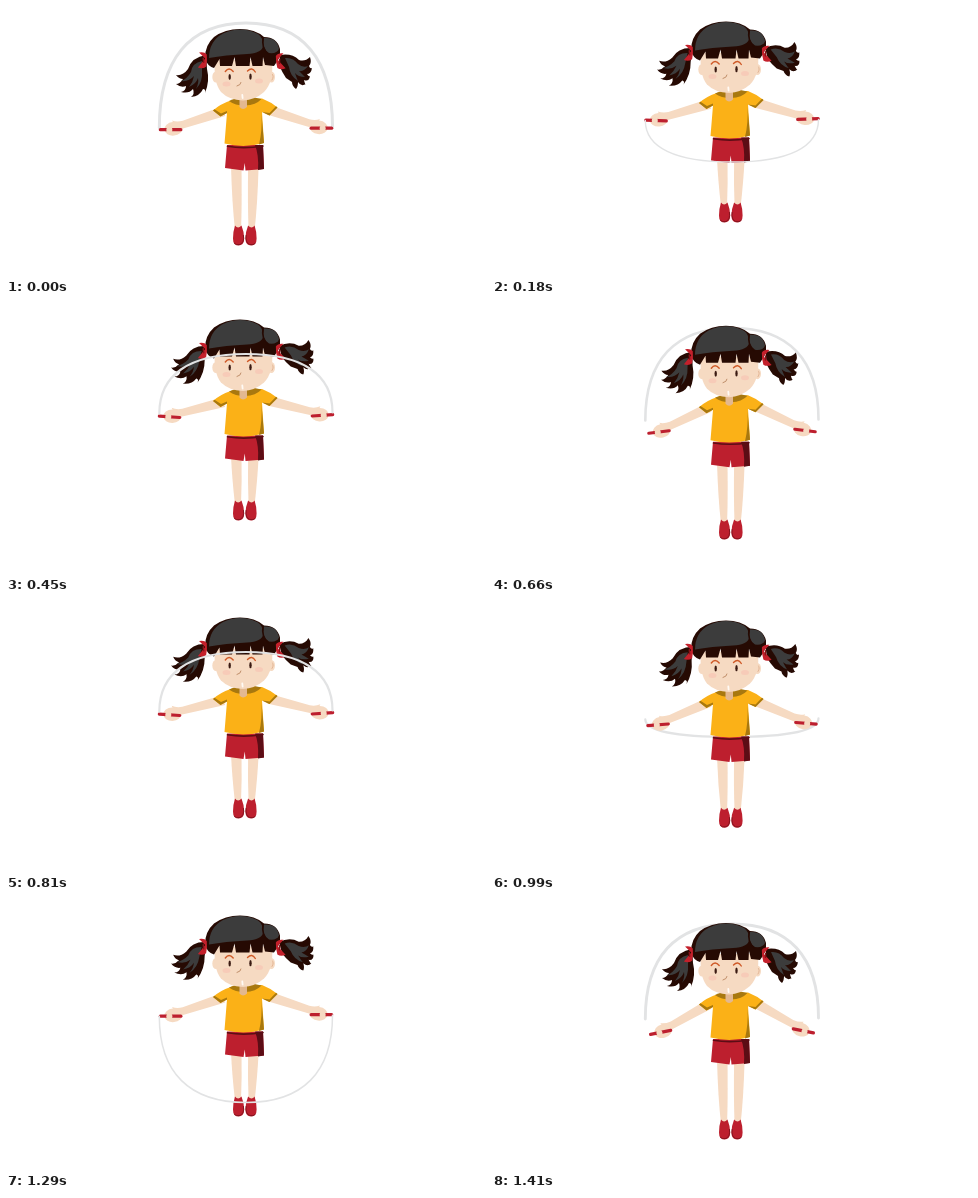
An HTML page with a canvas that plays this animation: 480 by 270 pixels, repeating every 1440 ms.

```html
<!DOCTYPE html>
<html lang="en">
<head>
<meta charset="utf-8">
<title>Skipping rope</title>
<style>
  html, body { margin: 0; width: 100%; height: 100%; overflow: hidden; background: #fff; }
  canvas { display: block; }
</style>
</head>
<body>
<canvas id="stage" width="480" height="270"></canvas>
<script>
const ctx = document.getElementById('stage').getContext('2d');
const STEP = 30;
const STEPS_PER_JUMP = 12;
const GRIP_TILT = 18;

const color = {
  hair: '#260a03', shine: '#3c3c3c', skin: '#f6dac2', neck: '#e3b890',
  shirt: '#fbb117', shirtShade: '#a8780f', red: '#bd1f2e', darkRed: '#5c0d15',
  bow: '#c4202b', brow: '#cf5a28', cheek: '#f7cbb8', rope: '#e2e3e4'
};

// Keys are [step, value] pairs over one jump
const motion = {
  jump:  [[0, 0], [1, .35], [2, .75], [3, 1], [8, 1], [9, .6], [10, .17], [11, 0], [12, 0]],
  arm:   [[0, 18], [1, 16], [3, 14], [6, 16], [8, 20], [10, 25], [11, 29], [12, 18]],
  apex:  [[0, 17], [1, 14], [2, 29], [3, 50], [6, 156], [8, 249], [9, 135], [10, 24], [11, 24], [12, 17]],
  grip:  [[0, 122], [3, 109.5], [6, 114.5], [8, 118], [10, 116.5], [11, 119], [12, 122]]
};

function valueAt(keys, step) {
  const i = keys.findIndex(key => key[0] > step);
  const [s0, v0] = keys[i - 1], [s1, v1] = keys[i];
  return v0 + (v1 - v0) * (step - s0) / (s1 - s0);
}

const rad = degrees => degrees * Math.PI / 180;

function fill(path, style) {
  ctx.fillStyle = style;
  ctx.fill(new Path2D(path));
}

function line(path, style, width) {
  ctx.strokeStyle = style;
  ctx.lineWidth = width;
  ctx.lineCap = 'round';
  ctx.stroke(new Path2D(path));
}

function oval(x, y, rx, ry, style, tilt = 0) {
  ctx.fillStyle = style;
  ctx.beginPath();
  ctx.ellipse(x, y, rx, ry, rad(tilt), 0, 2 * Math.PI);
  ctx.fill();
}

function placed(x, y, degrees, draw) {
  ctx.save();
  ctx.translate(x, y);
  ctx.rotate(rad(degrees));
  draw();
  ctx.restore();
}

function mirrored(axis, dy, draw) {
  ctx.save();
  ctx.translate(2 * axis, dy);
  ctx.scale(-1, 1);
  draw();
  ctx.restore();
}

function drawRope(step) {
  const apex = valueAt(motion.apex, step);
  const left = valueAt(motion.grip, step), right = left - 1;
  const bend = y => y + (apex - y) * .65;
  const width = 2.2 + .8 * Math.cos(2 * Math.PI * step / STEPS_PER_JUMP);
  line(`M153.3 ${left}C153.3 ${bend(left)} 183 ${apex} 240 ${apex}
        S326.5 ${bend(right)} 326.5 ${right}`, color.rope, width);
}

function drawArm(angle) {
  placed(212, 107, -angle, () => {
    fill('M6-5L-36-3.5Q-42-4-46-7L-44 5L-38 4L6 5Z', color.skin);
    placed(-48, 0, GRIP_TILT, () => {
      oval(1, 1, 9, 6.8, color.skin, -6);
      line('M-12 1.8L8.5 1.8', color.red, 3.2);
      oval(-3, 2, 3, 3.4, color.skin);
    });
  });
}

function drawLeg(top, foot) {
  fill(`M225 ${top}L235.5 ${top}Q236 ${foot - 38} 235 ${foot - 15}
        L229 ${foot - 15}Q226 ${foot - 42} 225 ${top}Z`, color.skin);
  const sole = foot + .5;
  fill(`M229 ${sole - 20}Q232 ${sole - 16} 235.5 ${sole - 20}Q238.3 ${sole - 13} 238.2 ${sole - 7}
        Q238 ${sole} 232.5 ${sole}Q227 ${sole} 227 ${sole - 7}Q227 ${sole - 14} 229 ${sole - 20}Z`, color.red);
  line(`M237.5 ${sole - 10}Q238.5 ${sole - 3} 234 ${sole - 1}Q230 ${sole} 228.5 ${sole - 2}`, '#84141f', 1);
}

function drawClothes() {
  fill('M221 139L257 139L258 163L239.5 164.5L238.8 157L237.5 164.5L219 162Z', color.red);
  fill('M249 139L257 139L258 163L252 164Q253 149 249 139Z', color.darkRed);
  line('M221.5 140.3Q238 143 257 140', color.darkRed, 1.6);

  fill('M226 94Q214 98 207 104.5L214.5 110.5L221 107L218.5 137.5Q238 142.5 258 137L256 106L263.5 109.5L271.5 101.5Q265 96 256 92.5Z', color.shirt);
  fill('M207 104.5L214.5 110.5L221 107L221 105L215 107.5L208.5 103.2Z', color.shirtShade);
  fill('M256 106L263.5 109.5L271.5 101.5L270 100.2L263.5 107Z', color.shirtShade);
  fill('M255.5 108L258 137L253 138.5Q256.5 124 255.5 108Z', color.shirtShade);
  fill('M223 95Q238 88 255.5 93Q250 99 239 99.5Q229 99.5 223 95Z', color.shirtShade);
  fill('M233.5 91L241 91L241 101Q237 105 233.5 101Z', color.neck);
}

function drawPigtails(swing) {
  placed(198, 53, swing, () => {
    fill(`M2-4Q-12-2-16 10Q-21 17-28 16Q-25 20-21 20Q-24 25-28 25Q-23 29-18 27
          Q-18 32-23 33Q-15 35-11 30Q-9 35-13 38Q-4 37-1 30Q2 30 1 34Q6 22 3 10Z`, color.hair);
    fill('M-2 2Q-12 4-13 13Q-17 20-23 22Q-15 23-10 17Q-11 23-15 28Q-8 25-6 19Q-5 24-8 30Q-1 23-2 12Z', color.shine);
  });
  placed(275, 53, -1.15 * swing, () => {
    fill(`M-1-4Q11-6 18 1Q24 3 29-2Q31 4 28 7Q29 10 31 9Q30 15 26 15Q28 18 29 17
          Q28 23 23 21Q24 26 25 25Q20 28 17 23Q17 28 15 30Q11 27 11 23L5 19Q1 13-1 8Z`, color.hair);
    fill('M4-1Q12-2 17 5Q22 9 27 7Q23 13 18 12Q22 16 24 18Q17 18 14 14Q16 20 17 22Q9 17 8 8Z', color.shine);
  });
}

function drawBow() {
  fill('M3-2L-4-7Q1-9 4-6L5 0L5 6Q2 9-3 8Z', color.bow);
  line('M1-2L2 2', '#861319', 1.5);
}

function drawFace() {
  oval(210, 71, 3.7, 5.5, color.skin);
  oval(265.5, 71, 3.5, 5.5, color.skin);
  line('M266 68Q268.5 70 266 74', '#e3b594', 1);
  fill('M209 54L266 54Q268 76 258 86Q249 94 237 94.5Q223 94 215 86Q207 76 209 54Z', color.skin);
  oval(220.5, 78, 4, 2.5, color.cheek);
  oval(253, 75, 4, 2.5, color.cheek);
  oval(223.7, 71, 1.2, 3.1, '#3a1a12');
  oval(244.5, 70.7, 1.2, 3.1, '#3a1a12');
  line('M219.3 65.5Q223 60.5 227.2 65.5', color.brow, 1.4);
  line('M241.5 65Q246 60.5 249.3 66', color.brow, 1.4);
  line('M235 76.5Q235 79 231 80', '#c08f6b', 1);
  line('M236.3 89L236.6 92', '#fffaf5', 1.8);
}

function drawHair() {
  fill(`M199 52Q199 39 208 31Q219 23 234 23Q249 23 258 31Q271 31 274 43L274 50Q271 56 268 60
        L259 59L257 51L256.5 60L246.5 60L244.5 51L243.5 60L230 60L228.5 51L226 60L214 60L213.5 53L208 62Q201 60 199 52Z`, color.hair);
  fill('M203 52Q203 35 217 27.5Q235 19.5 252 28Q257 31 257 40Q256 47 241 48Q219 49 203 52Z', color.shine);
  fill('M258 32Q271 31 273 43Q271 48 263 47Q256 43 258 32Z', color.shine);
  line('M257 32Q255 41 262 48', color.hair, 1.3);
}

function drawGirl(step) {
  const jump = valueAt(motion.jump, step);
  const angle = valueAt(motion.arm, step);
  const lift = 7.5 * jump;
  const leg = () => drawLeg(160 - lift, 239 - 23 * jump);

  leg();
  mirrored(238.8, 0, leg);

  ctx.save();
  ctx.translate(0, -lift);
  drawArm(angle);
  mirrored(240, -1.5, () => drawArm(angle));
  drawClothes();
  drawPigtails(13 * jump);
  drawFace();
  drawHair();
  placed(196, 54, 8, drawBow);
  mirrored(240, 0, () => placed(205, 55, 12, drawBow));
  ctx.restore();
}

function render(now) {
  const step = Math.floor(now / STEP) % STEPS_PER_JUMP;
  const ropeInFront = step >= 1 && step <= 8;
  ctx.fillStyle = '#fff';
  ctx.fillRect(0, 0, 480, 270);
  if (!ropeInFront) drawRope(step);
  drawGirl(step);
  if (ropeInFront) drawRope(step);
}

const start = performance.now();
function tick() {
  render(performance.now() - start);
  requestAnimationFrame(tick);
}
tick();
</script>
</body>
</html>
```
